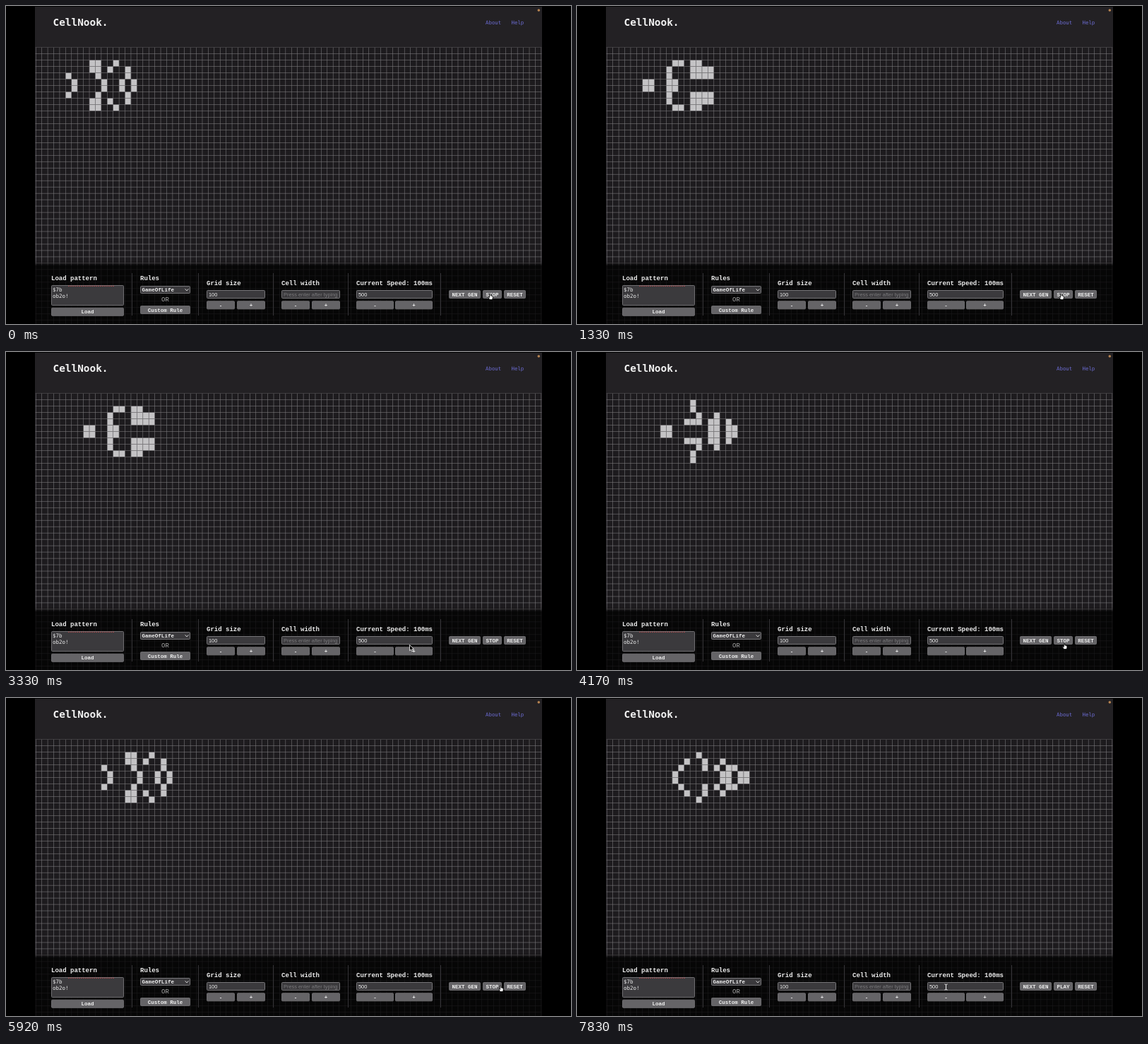
Animation of 800 by 450 pixels, one loop 8 s. Source, as an HTML page with a canvas:

```html
<!DOCTYPE html>
<html lang="en">
<head>
<meta charset="utf-8">
<title>Life grid</title>
<style>
html, body { margin: 0; width: 100%; height: 100%; overflow: hidden; background: #000; }
canvas { display: block; }
</style>
</head>
<body>
<canvas id="stage" width="800" height="450"></canvas>
<script>
const ctx = document.getElementById('stage').getContext('2d');
const LOOP = 8000, STOPPED = 6700, LAST = 67;
// The page is 1280 units wide and shown 718.4 px wide; a cell is 15 by 16 units.
const UNIT = 718.4 / 1280;
const PITCH_X = 15 * UNIT, PITCH_Y = 16 * UNIT, LEFT = 42.25, TOP = 58.6;
const COLS = 85, ROWS = 44;
const MONO = '"Liberation Mono", monospace';
const CODE = '"DejaVu Sans Mono", monospace';
const SANS = '"Liberation Sans", sans-serif';

// Upper half of a symmetric spaceship: live columns per row, starting at row 2.
const half = [[9, 10, 13], [9, 10, 12, 15], [5, 10, 15], [6, 11, 14, 16]];
const W = 40, H = 14;
const board = Array.from({ length: H }, () => new Uint8Array(W));
[...half, ...half.slice().reverse()].forEach((cols, r) => cols.forEach(c => board[r + 2][c] = 1));

function evolve(b) {
  const at = (r, c) => b[r] && b[r][c] || 0;
  return b.map((row, r) => row.map((alive, c) => {
    let n = -alive;
    for (let i = -1; i < 2; i++) for (let j = -1; j < 2; j++) n += at(r + i, c + j);
    return n === 3 || (alive && n === 2) ? 1 : 0;
  }));
}
const gens = [board];
while (gens.length <= LAST) gens.push(evolve(gens[gens.length - 1]));

function rect(x, y, w, h, fill) {
  ctx.fillStyle = fill;
  ctx.fillRect(x, y, w, h);
}

function text(s, x, y, font, fill, align = 'left') {
  ctx.font = font;
  ctx.fillStyle = fill;
  ctx.textAlign = align;
  ctx.fillText(s, x, y);
}

function box(x, y, w, h, fill, line) {
  ctx.beginPath();
  ctx.roundRect(x + 0.5, y + 0.5, w - 1, h - 1, 1);
  ctx.fillStyle = fill;
  ctx.fill();
  ctx.strokeStyle = line;
  ctx.lineWidth = 1;
  ctx.stroke();
}

function button(label, x, y, w, h = 12) {
  box(x, y, w, h, '#656467', '#6b6a6d');
  text(label, x + w / 2, y + h / 2 + 2.5, 'bold 7.5px ' + MONO, '#f0f0f0', 'center');
}

function field(value, x, w, hint) {
  box(x, 402, w, 12, '#3b3a3d', '#757477');
  ctx.save();
  ctx.beginPath();
  ctx.rect(x, 402, w - 2, 12);
  ctx.clip();
  text(value, x + 3, 410.6, '7.4px ' + SANS, hint ? '#7b7a7d' : '#f0f0f0');
  ctx.restore();
}

function label(s, x, y) {
  text(s, x, y, 'bold 9px ' + MONO, '#ececec');
}

function stepper(title, value, x, w, hint) {
  label(title, x, 394.6);
  field(value, x, w, hint);
  const bw = Math.floor(w / 2) - 1;
  button('-', x, 417.3, bw);
  button('+', x + w - bw, 417.3, bw);
}

function drawGrid(cells) {
  rect(41, 58, 718, 392, '#1d1b1e');
  const line = '#7d7b7e';
  for (let c = 0; c <= COLS; c++) rect(LEFT + c * PITCH_X - UNIT / 2, 58.4, UNIT, 391.6, line);
  for (let r = 0; r < ROWS; r++) rect(41.5, TOP + r * PITCH_Y - UNIT / 2, 717, UNIT, line);
  cells.forEach((row, r) => row.forEach((alive, c) => {
    if (alive) rect(LEFT + c * PITCH_X + UNIT / 2, TOP + r * PITCH_Y + UNIT / 2, PITCH_X - UNIT, PITCH_Y - UNIT, '#c4c3c5');
  }));
}

function drawHeader() {
  rect(41, 1, 718, 57.4, '#232124');
  text('CellNook.', 66.5, 28.2, 'bold 14.4px ' + CODE, '#f2f2f2');
  text('About', 679, 25.7, '7.4px ' + CODE, '#6b6bd0');
  text('Help', 715.5, 25.7, '7.4px ' + CODE, '#6b6bd0');
  ctx.beginPath();
  ctx.arc(754.3, 6, 1.8, 0, 7);
  ctx.fillStyle = '#b98552';
  ctx.fill();
}

function drawPanel(toggle) {
  const shade = ctx.createLinearGradient(0, 361, 0, 367);
  shade.addColorStop(0, 'rgba(0,0,0,0)');
  shade.addColorStop(1, 'rgba(0,0,0,.6)');
  rect(41, 361, 718, 6, shade);
  rect(41, 367, 718, 83, 'rgba(0,0,0,.79)');
  for (const x of [178, 272, 378, 484, 615]) rect(x, 378, 1, 60, '#343336');

  label('Load pattern', 64, 387.8);
  box(64, 395, 103, 29, '#3b3a3d', '#6f6e71');
  ctx.setLineDash([2, 1]);
  ctx.strokeStyle = '#a8484a';
  ctx.beginPath();
  ctx.moveTo(88, 396.3);
  ctx.lineTo(153, 396.3);
  ctx.stroke();
  ctx.setLineDash([]);
  text('$7b', 66, 404.3, '7.5px ' + CODE, '#ececec');
  text('ob2o!', 66, 413.2, '7.5px ' + CODE, '#ececec');
  button('Load', 64, 426.8, 103);

  label('Rules', 190, 387.8);
  box(190, 396, 71, 11, '#3b3a3d', '#757477');
  text('GameOfLife', 192.5, 404, 'bold 7.6px ' + MONO, '#f0f0f0');
  ctx.strokeStyle = '#d8d8d8';
  ctx.beginPath();
  ctx.moveTo(253.5, 400.5);
  ctx.lineTo(256, 402.8);
  ctx.lineTo(258.5, 400.5);
  ctx.stroke();
  text('OR', 225.5, 417.8, '9px ' + MONO, '#a5a5a5', 'center');
  button('Custom Rule', 190, 424, 71);

  stepper('Grid size', '100', 284, 83);
  stepper('Cell width', 'Press enter after typing', 390, 83, true);
  stepper('Current Speed: 100ms', '500', 496, 108);
  button('NEXT GEN', 627, 402, 45);
  button(toggle, 675, 402, 27);
  button('RESET', 705, 402, 31);
}

// Pointer stops: time, x, y of the tip.
const path = [
  [0, 685.4, 406.9], [2600, 685.4, 406.9], [3330, 571.5, 414.5], [3700, 575, 422],
  [4170, 690, 412], [4500, 722, 409], [4900, 702.6, 409.2], [5100, 702.6, 409.2],
  [5830, 700.3, 406.9], [7200, 700.3, 406.9], [7600, 545, 389.5], [7830, 522.5, 409]
];

function pointer(t) {
  const i = path.findIndex(p => p[0] > t);
  if (i < 0) return path[path.length - 1].slice(1);
  const [t0, x0, y0] = path[i - 1], [t1, x1, y1] = path[i];
  const k = (t - t0) / (t1 - t0), e = k * k * (3 - 2 * k);
  return [x0 + (x1 - x0) * e, y0 + (y1 - y0) * e];
}

const inside = (x, y, [l, t, r, b]) => x >= l && x <= r && y >= t && y <= b;
const clickable = [[627, 402, 672, 414], [675, 402, 702, 414], [705, 402, 736, 414],
  [496, 417, 549, 430], [551, 417, 604, 430]];
const arrow = new Path2D('M0 0V8.2L2 6.4L3.3 9.3L4.8 8.6L3.5 5.8H6Z');
const hand = new Path2D('M-.7 .5Q0-.5 .7 .5V3L1.8 3.1L2.9 3.6L3.9 4.1V6.3L3.1 8.6H-.5L-2.5 5.6Q-2.5 4.5-1.4 5L-.7 5.6Z');
const beam = new Path2D('M-2-4Q-.3-4 0-3Q.3-4 2-4M0-3V3M-2 4Q-.3 4 0 3Q.3 4 2 4');

function drawPointer(t) {
  const [x, y] = pointer(t);
  ctx.save();
  ctx.translate(x, y);
  if (inside(x, y, [496, 402, 604, 414])) {
    ctx.lineWidth = 1;
    ctx.strokeStyle = '#f2f2f2';
    ctx.stroke(beam);
  } else {
    const over = clickable.some(b => inside(x, y, b));
    const shape = over ? hand : arrow;
    ctx.fillStyle = over ? '#fff' : '#000';
    ctx.strokeStyle = over ? '#000' : '#fff';
    ctx.lineWidth = 0.8;
    ctx.fill(shape);
    ctx.stroke(shape);
  }
  ctx.restore();
}

function draw(now) {
  const t = now % LOOP, stopped = t >= STOPPED;
  const gen = stopped ? LAST : Math.min(LAST - 1, Math.floor((t + 90) / 100));
  rect(0, 0, 800, 450, '#000');
  drawGrid(gens[gen]);
  drawHeader();
  drawPanel(stopped ? 'PLAY' : 'STOP');
  drawPointer(t);
}

const start = performance.now();
function frame() {
  draw(performance.now() - start);
  requestAnimationFrame(frame);
}
frame();
</script>
</body>
</html>
```
